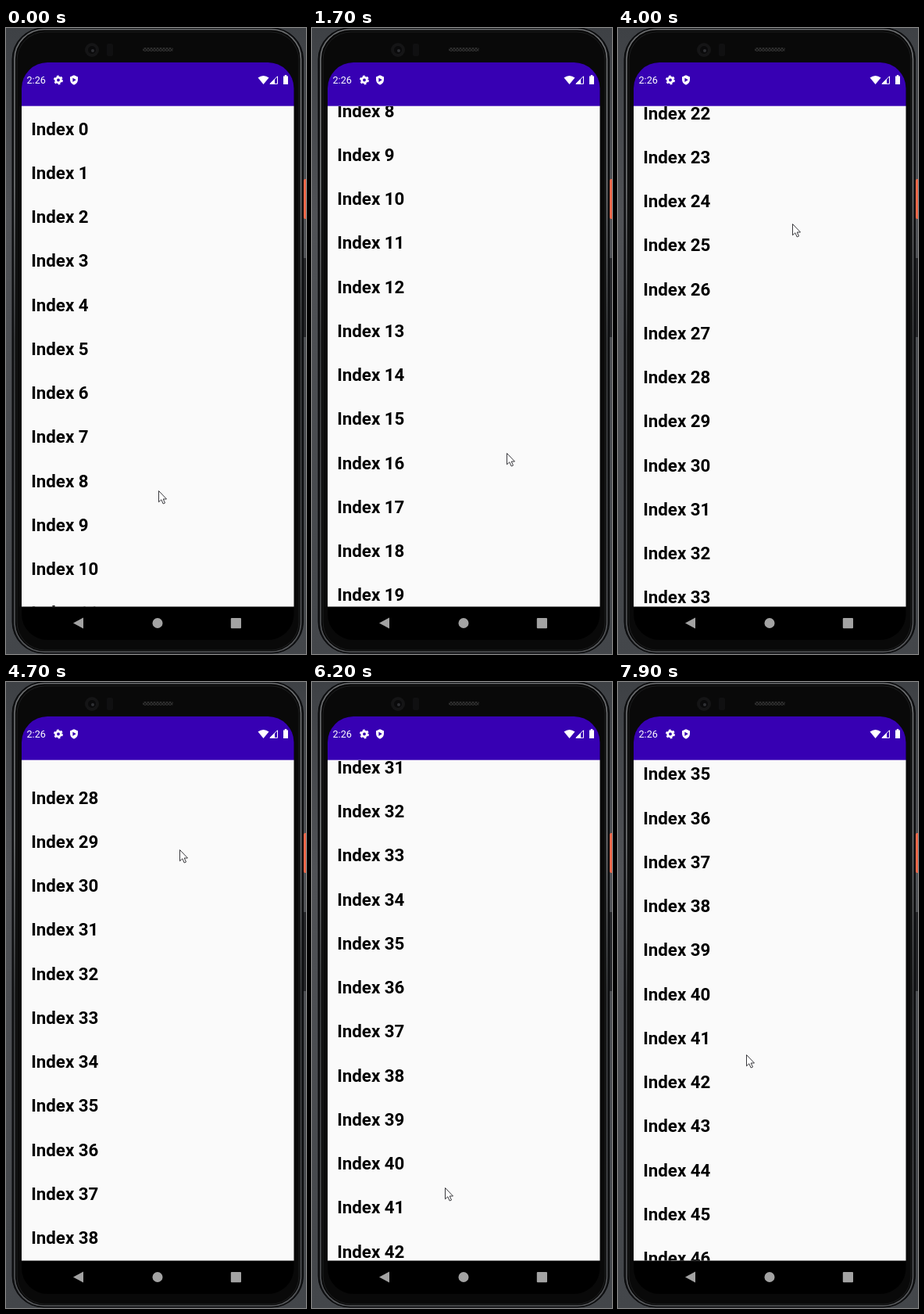
An HTML page that plays this animation: 384 px wide and 800 px high, repeating every 8 s.

```html
<!DOCTYPE html>
<html lang="en">
<head>
<meta charset="utf-8">
<title>Scrolling list</title>
<style>
  html, body { margin: 0; width: 100%; height: 100%; overflow: hidden; background: #494b4f; }
  svg { display: block; width: 384px; height: 800px; }
  text { font-family: Roboto, sans-serif; }
  #list text { font-size: 22.3px; font-weight: 700; fill: #000; }
</style>
</head>
<body>
<svg viewBox="0 0 384 800">
  <defs>
    <linearGradient id="backdrop" x2="0" y2="1">
      <stop offset="0" stop-color="#3e4145"/>
      <stop offset=".3" stop-color="#505256"/>
      <stop offset="1" stop-color="#43464a"/>
    </linearGradient>
    <linearGradient id="rim" x2="0" y2="1">
      <stop offset="0" stop-color="#6c6e70"/>
      <stop offset=".25" stop-color="#77797b"/>
      <stop offset=".5" stop-color="#3c3e40"/>
      <stop offset="1" stop-color="#55575a"/>
    </linearGradient>
    <clipPath id="listArea"><rect x="20" y="100" width="348.5" height="639.5"/></clipPath>
    <pattern id="mesh" width="4" height="4" patternUnits="userSpaceOnUse">
      <rect width="4" height="4" fill="#151515"/>
      <path d="M0 0L4 4M4 0L0 4" stroke="#2e2e2e"/>
    </pattern>
  </defs>

  <rect width="384" height="800" fill="url(#backdrop)"/>

  <!-- side buttons -->
  <rect x="381" y="193" width="8" height="51" rx="2" fill="#ed6749"/>
  <rect x="381" y="294" width="3" height="101" fill="#242528"/>

  <!-- phone body -->
  <rect x="8" y="0" width="372.5" height="799" rx="40" fill="#111214" stroke="#08090a"/>
  <rect x="11" y="1.7" width="366.5" height="795.6" rx="38" fill="#080808" stroke="url(#rim)" stroke-width="1.6"/>
  <rect x="14" y="5" width="361" height="790" rx="36" fill="#090909" stroke="#1d1e1f"/>
  <circle cx="110" cy="28" r="9" fill="#151516"/>
  <circle cx="110" cy="28" r="5" fill="#0a0a0b"/>
  <circle cx="111" cy="29" r="2" fill="#303135"/>
  <rect x="129" y="20" width="8" height="16" rx="2" fill="#101011"/>
  <rect x="175" y="25" width="39" height="5" rx="2" fill="url(#mesh)"/>

  <!-- screen -->
  <rect x="20" y="44" width="348.5" height="738" rx="33" fill="#000"/>
  <path d="M20 100V77A33 33 0 0 1 53 44H335.5A33 33 0 0 1 368.5 77V100Z" fill="#3700b3"/>
  <rect x="20" y="99.7" width="348.5" height="639.8" fill="#fafafa"/>

  <!-- status bar -->
  <g fill="#fff">
    <text x="26.5" y="71" font-size="12.6">2:26</text>
    <circle cx="67" cy="66.5" r="3.3" fill="none" stroke="#fff" stroke-width="2.8"/>
    <circle cx="67" cy="66.5" r="5.1" fill="none" stroke="#fff" stroke-width="1.8" stroke-dasharray="2.67"/>
    <path d="M87 60.3L92 62.4V66Q92 70.5 87 72.7Q82 70.5 82 66V62.4Z"/>
    <path d="M85.4 63.7L89.8 66.3L85.4 68.9Z" fill="#3700b3"/>
    <path d="M322.5 63.6Q329.5 58.6 336.5 63.6L329.5 72Z"/>
    <path d="M338 71.3L347.5 61.8V71.3Z" fill="none" stroke="#fff"/>
    <path d="M337.5 71.5L344 65V71.5Z"/>
    <path d="M355 61.5H356.8V60H359.2V61.5H361V72H355Z"/>
  </g>

  <g clip-path="url(#listArea)"><g id="list"></g></g>

  <!-- navigation bar -->
  <g fill="#a3a3a3">
    <path d="M86 760.5L99 753.5V767.5Z"/>
    <circle cx="194" cy="760.5" r="6.5"/>
    <rect x="287.8" y="754" width="13.2" height="13.2" rx="1"/>
  </g>

  <path id="cursor" d="M.5 .5V14.8L3.8 11.8L6.2 17L8.5 16L6.2 11H10.5Z"
        fill="#fff" stroke="#38383c" stroke-width="1" stroke-linejoin="round"/>
</svg>
<script>
const LOOP = 8000, STEP = 100, ROW = 56.25, ROWS = 50;
const PULL = 17, GLIDE = 700;
const list = document.getElementById('list');
const cursor = document.getElementById('cursor');

for (let i = 0; i < ROWS; i++) {
  const row = document.createElementNS('http://www.w3.org/2000/svg', 'text');
  row.setAttribute('x', 32.3);
  row.setAttribute('y', 136.7 + i * ROW);
  row.textContent = 'Index ' + i;
  list.append(row);
}

const linear = p => p;
const smooth = p => p * p * (3 - 2 * p);
const fling = p => 1 - (1 - p) ** 2;

// The list is flicked: a short pull under the pointer, then a glide to rest.
const flicks = [
  { time: 400, scroll: PULL, rest: 456, x: 205, y: 575 },
  { time: 1700, scroll: 473, rest: 941, x: 249, y: 543 },
  { time: 3000, scroll: 958, rest: 1240, x: 251, y: 380 },
  { time: 4000, scroll: 1257.5, rest: 1556, x: 223, y: 250 },
  { time: 6000, scroll: 1573, rest: 1962, x: 171, y: 682 },
  { time: 7900, scroll: 1980, rest: 2400, x: 164, y: 476 }
];

// Each key: time, values, easing towards that key.
const scrollKeys = [[0, [0]]];
const cursorKeys = [[0, [195, 591]], [5300, [196, 282], smooth], [7200, [168, 700], smooth]];
for (const { time, scroll, rest, x, y } of flicks) {
  scrollKeys.push(
    [time - STEP, [scroll - PULL], linear],
    [time, [scroll], linear],
    [time + GLIDE, [rest], fling]);
  cursorKeys.push(
    [time - STEP, [x, y + 22], smooth],
    [time, [x, y], linear],
    [time + STEP, [x - 1, y - 36], linear],
    [time + GLIDE, [x - 1, y - 36], linear]);
}
cursorKeys.sort((a, b) => a[0] - b[0]);

function sample(keys, time) {
  const next = keys.findIndex(key => key[0] > time);
  const [start, from] = keys[next - 1], [end, to, ease] = keys[next];
  const p = ease((time - start) / (end - start));
  return from.map((value, i) => value + (to[i] - value) * p);
}

function draw(now) {
  const time = Math.floor(now % LOOP / STEP) * STEP;
  const [scroll] = sample(scrollKeys, time);
  const [x, y] = sample(cursorKeys, time).map(Math.round);
  list.setAttribute('transform', `translate(0 ${-scroll})`);
  cursor.setAttribute('transform', `translate(${x} ${y})`);
}

const begin = performance.now();
function tick() {
  draw(performance.now() - begin);
  requestAnimationFrame(tick);
}
tick();
</script>
</body>
</html>
```
